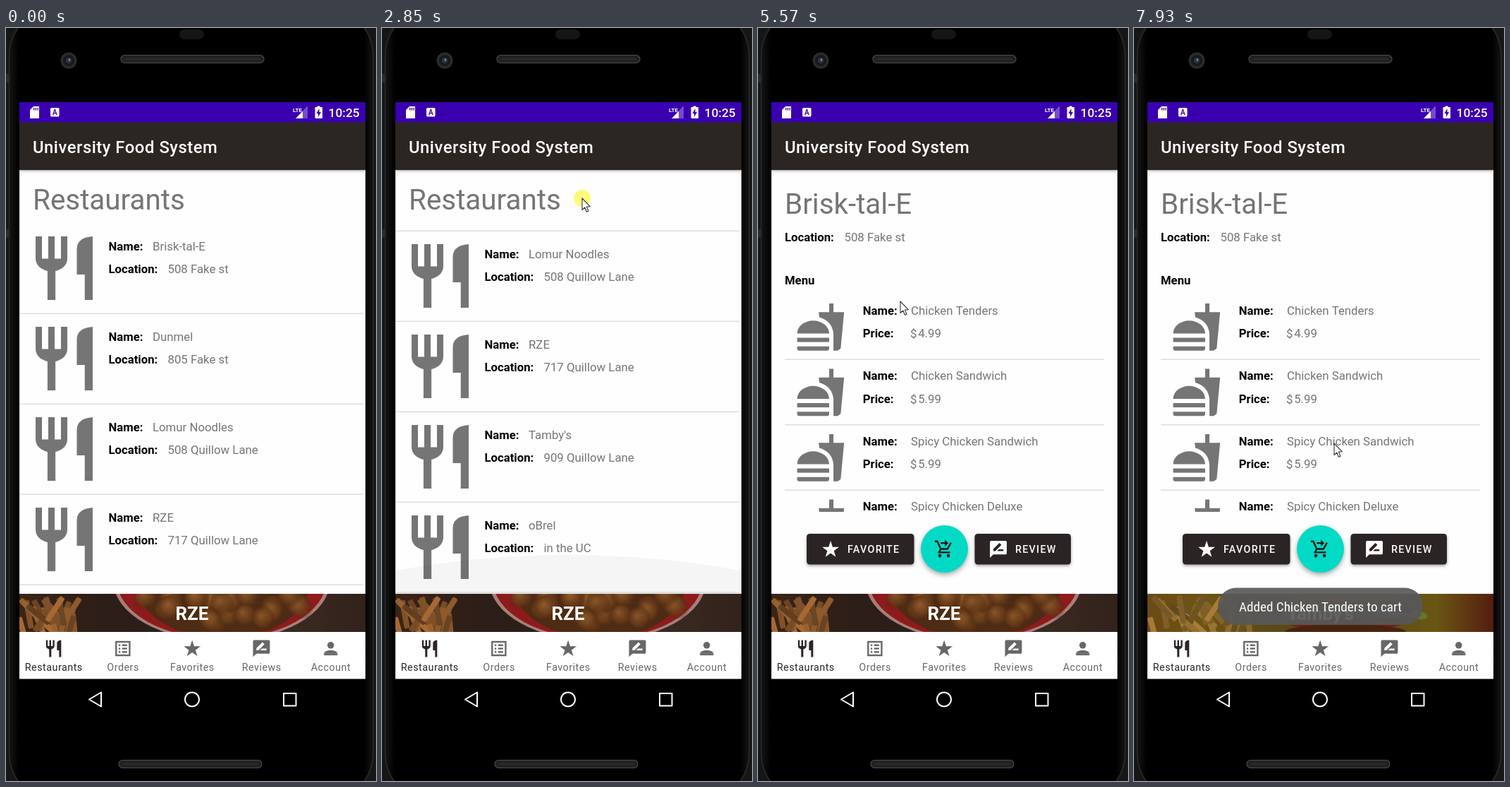
These frames come from a looping animation (525 by 1066 pixels, 8000 ms). An HTML page with a canvas:

```html
<!DOCTYPE html>
<html lang="en">
<head>
<meta charset="utf-8">
<title>University Food System</title>
<style>
html, body { margin: 0; width: 100%; height: 100%; overflow: hidden; background: #000; }
canvas { display: block; }
</style>
</head>
<body>
<canvas id="stage" width="525" height="1066"></canvas>
<script>
const ctx = document.getElementById('stage').getContext('2d');
const LOOP = 8000, STEP = 78, ANCHOR = 2060, OPEN = 4640;
const GRAY = '#757575', DARK = '#2b2424', RULE = '#dedede', PURPLE = '#3a00b0';
const ROW = 128, ITEM = 92.5, SCROLL_MAX = 245, GLOW_TIME = 450;

const places = [
  ['Brisk-tal-E', '508 Fake st'], ['Dunmel', '805 Fake st'],
  ['Lomur Noodles', '508 Quillow Lane'], ['RZE', '717 Quillow Lane'],
  ["Tamby's", '909 Quillow Lane'], ['oBrel', 'in the UC']
];
const menu = [
  ['Chicken Tenders', '4.99'], ['Chicken Sandwich', '5.99'],
  ['Spicy Chicken Sandwich', '5.99'], ['Spicy Chicken Deluxe', '6.99']
];
const tabs = [['fork', 'Restaurants'], ['list', 'Orders'], ['star', 'Favorites'],
  ['review', 'Reviews'], ['person', 'Account']];

// Pointer stops: time, x, y
const stops = [
  [812, 496, 407], [1100, 340, 334], [1370, 261, 357], [2060, 261, 357],
  [2380, 285, 500], [2840, 284, 241], [2930, 285, 183], [3620, 335, 789], [3780, 338, 842],
  [4560, 296, 300], [5020, 290, 292], [5250, 98, 231], [5570, 202, 387], [5800, 280, 570],
  [6040, 288, 340], [6240, 290, 560], [6506, 291, 438], [6670, 291, 400], [7140, 291, 432],
  [7390, 291, 432], [7910, 284, 588]
];
const presses = [[2380, 3740], [4480, OPEN], [6040, 6690], [7390, 7460]];
const drags = [[2380, 2930], [2930, 3740]];

const clamp = (v, lo, hi) => Math.min(hi, Math.max(lo, v));
const noise = n => { const r = Math.sin(n * 12.9898) * 43758.5453; return r - Math.floor(r); };

function pointerAt(t) {
  const i = stops.findIndex(s => s[0] > t);
  if (i <= 0) return (i ? stops[stops.length - 1] : stops[0]).slice(1);
  const [t0, x0, y0] = stops[i - 1], [t1, x1, y1] = stops[i], k = (t - t0) / (t1 - t0);
  return [x0 + (x1 - x0) * k, y0 + (y1 - y0) * k];
}

// The list follows the pointer while it is dragged
function scrollAt(t) {
  let s = 0;
  for (const [from, to] of drags)
    if (t > from) s = clamp(s + pointerAt(from)[1] - pointerAt(Math.min(t, to))[1], 0, SCROLL_MAX);
  return s;
}

function rect(x, y, w, h, fill) { ctx.fillStyle = fill; ctx.fillRect(x, y, w, h); }

function round(x, y, w, h, r, fill, stroke, line = 1) {
  ctx.beginPath();
  ctx.roundRect(x, y, w, h, r);
  if (fill) { ctx.fillStyle = fill; ctx.fill(); }
  if (stroke) { ctx.strokeStyle = stroke; ctx.lineWidth = line; ctx.stroke(); }
}

function oval(x, y, rx, ry, fill, turn = 0, from = 0, to = Math.PI * 2) {
  ctx.beginPath();
  ctx.ellipse(x, y, rx, ry, turn, from, to);
  if (fill) ctx.fillStyle = fill;
  ctx.fill();
}

function trace(...p) {
  ctx.moveTo(p[0], p[1]);
  for (let i = 2; i < p.length; i += 2) ctx.lineTo(p[i], p[i + 1]);
}

function poly(...p) {
  ctx.beginPath();
  trace(...p);
  ctx.closePath();
  ctx.fill();
}

// Icons on a 24 unit grid, drawn in the current colour
const icons = {
  fork() {
    for (const x of [3, 7, 11]) ctx.fillRect(x, 2, 2, 7.1);
    oval(8, 9, 5, 4, null, 0, 0, Math.PI);
    ctx.fillRect(6.75, 12, 2.5, 10);
    ctx.beginPath();
    ctx.moveTo(21, 2);
    ctx.quadraticCurveTo(16, 2.4, 16, 6);
    for (const [x, y] of [[16, 14], [18.5, 14], [18.5, 22], [21, 22]]) ctx.lineTo(x, y);
    ctx.fill();
  },
  list() {
    ctx.strokeRect(4, 4, 16, 16);
    for (const y of [7, 11, 15]) { ctx.fillRect(7, y, 2, 2); ctx.fillRect(11, y, 6, 2); }
  },
  star() {
    const p = [];
    for (let i = 0; i < 10; i++) {
      const r = i % 2 ? 4.1 : 10.5, a = i * Math.PI / 5;
      p.push(12 + r * Math.sin(a), 12.5 - r * Math.cos(a));
    }
    poly(...p);
  },
  review() {
    ctx.beginPath();
    trace(2, 3, 3, 2, 21, 2, 22, 3, 22, 17, 21, 18, 6, 18, 2, 22);
    trace(6, 14, 6, 11.5, 13.2, 4.4, 15.6, 6.8, 8.5, 14);
    trace(10.5, 14, 12.5, 12, 18, 12, 18, 14);
    ctx.fill('evenodd');
  },
  person() {
    oval(12, 8, 4, 4);
    oval(12, 18, 8, 4, null, 0, Math.PI);
    ctx.fillRect(4, 17.9, 16, 2.1);
  },
  meal() {
    oval(8.5, 15, 7.5, 6, null, 0, Math.PI);
    ctx.fillRect(1, 17, 15, 2);
    round(1, 21, 15, 2, [0, 0, 1, 1]);
    ctx.fill();
    ctx.beginPath();
    trace(11.1, 5, 16, 5, 16, 1, 18, 1, 18, 5, 23, 5, 21.4, 22, 20, 23, 18, 23, 18, 15);
    ctx.quadraticCurveTo(17.4, 9.2, 11.4, 7.4);
    ctx.fill();
  },
  cart() {
    ctx.beginPath();
    trace(1, 3, 4, 3, 8, 12, 16, 12, 20.2, 4.5);
    trace(8, 12, 6, 16, 19, 16);
    trace(8, 5, 14, 5);
    ctx.stroke();
    poly(13, 1, 17, 5, 13, 9);
    for (const x of [7, 17]) oval(x, 20, 2, 2);
  }
};

function icon(name, x, y, scale, color) {
  ctx.save();
  ctx.translate(x, y);
  ctx.scale(scale, scale);
  ctx.fillStyle = ctx.strokeStyle = color;
  ctx.lineWidth = 2;
  ctx.lineJoin = 'miter';
  icons[name]();
  ctx.restore();
}

const smallIcon = (name, cx, cy, color) => icon(name, cx - 14.3, cy - 14.3, 1.195, color);

function text(s, x, y, size, color, weight = 400, align = 'left', spacing = 0) {
  ctx.font = `${weight} ${size}px Roboto, sans-serif`;
  ctx.letterSpacing = spacing + 'px';
  ctx.textAlign = align;
  ctx.fillStyle = color;
  ctx.fillText(s, x, y);
}

function field(label, value, x, valueX, y) {
  text(label, x, y, 16.7, '#000', 700);
  text(value, valueX, y, 16.8, GRAY);
}

function clipped(x, y, w, h, draw) {
  ctx.save();
  ctx.beginPath();
  ctx.rect(x, y, w, h);
  ctx.clip();
  draw();
  ctx.restore();
}

function shadowed(alpha, blur, dy, draw) {
  ctx.save();
  ctx.shadowColor = `rgba(0,0,0,${alpha})`;
  ctx.shadowBlur = blur;
  ctx.shadowOffsetY = dy;
  draw();
  ctx.restore();
}

// Overscroll bulge that swells and fades; dir 1 hangs down, -1 rises
function glow(x, y, w, dir, depth, age) {
  if (age <= 0 || age >= GLOW_TIME) return;
  const edge = depth * .6;
  ctx.beginPath();
  trace(x, y, x, y + dir * edge);
  ctx.quadraticCurveTo(x + w / 2, y + dir * (2 * depth - edge), x + w, y + dir * edge);
  ctx.lineTo(x + w, y);
  ctx.fillStyle = `rgba(0,0,0,${.22 * Math.sin(Math.PI * age / GLOW_TIME)})`;
  ctx.fill();
}

function phone() {
  rect(0, 0, 525, 1066, '#161616');
  for (const y of [65, 285]) rect(0, y, 4, 12, '#2a2a2a');
  const side = ctx.createLinearGradient(5, 0, 521, 0);
  [[0, '#141414'], [.025, '#000'], [.975, '#000'], [1, '#141414']].forEach(s => side.addColorStop(...s));
  round(4.5, -30, 516.5, 1126, 70, side, '#2b2b2b', 1.5);
  round(246, 2, 35, 14, 7, '#151515');
  oval(89, 46, 11.5, 11.5, '#2b2b2d');
  oval(89, 46, 8, 8, '#18191c');
  oval(89, 46, 4, 4, '#2d3444');
  oval(90, 45, 1.5, 1.5, '#858b98');
  for (const [x, y] of [[163, 38.5], [160, 1036.5]]) {
    round(x, y, 203, 11, 5.5, '#222', '#4c4c4c', 1.2);
    rect(x + 6, y + 5, 191, 1, '#343434');
  }
  ctx.strokeStyle = '#fff';
  ctx.lineWidth = 2;
  ctx.lineJoin = 'round';
  ctx.beginPath();
  trace(135, 940.5, 118, 950.5, 135, 960.5);
  ctx.closePath();
  ctx.moveTo(274, 950.5);
  ctx.arc(264, 950.5, 10, 0, Math.PI * 2);
  ctx.rect(394, 942, 17.5, 17.5);
  ctx.stroke();
}

function bars() {
  shadowed(.4, 4, 1, () => rect(19, 133, 491, 68, '#2c2623'));
  rect(19, 105, 491, 28.5, PURPLE);
  text('University Food System', 38, 176.5, 23.9, '#fff', 500, 'left', .5);

  ctx.fillStyle = '#fff';
  poly(39, 111, 47, 111, 47, 128, 34, 128, 34, 116);
  for (let i = 0; i < 3; i++) rect(39 + i * 2.7, 113, 1.4, 3.5, PURPLE);
  round(63, 113, 12.5, 12.5, 1.5, '#fff');
  text('A', 69.3, 123, 10, PURPLE, 700, 'center');
  text('LTE', 407, 118.5, 8, '#fff', 700);
  ctx.fillStyle = 'rgba(255,255,255,.3)';
  poly(428, 110, 428, 128, 411, 128);
  ctx.fillStyle = '#fff';
  poly(421, 118, 421, 128, 411, 128);
  rect(441.5, 110.5, 4, 3, '#fff');
  round(438.5, 112, 10.5, 16, 1, '#fff');
  ctx.fillStyle = PURPLE;
  poly(444.5, 114, 440.5, 121, 443, 121, 443, 126, 447, 119, 444.5, 119);
  text('10:25', 457.5, 126, 17.4, '#fff', 500);

  rect(19, 855, 491, 66.5, '#fff');
  tabs.forEach(([name, label], i) => {
    const x = 67.5 + i * 98.3, color = i ? '#676767' : DARK;
    smallIcon(name, x, 878.5, color);
    text(label, x + .25, 910, 14.3, color, 400, 'center', .5);
  });
}

// Loose fries heaped in the lower left corner
function fries(n, spread, hue) {
  for (let i = 0; i < n; i++) {
    const x = spread * noise(i + 1);
    ctx.save();
    ctx.translate(19 + x, 818 + 36 * noise(i + 40));
    ctx.rotate(-1 + 1.7 * noise(i + 80));
    round(-4, -18, 8, 40, 2, `hsl(${hue},52%,${25 + 18 * noise(i + 9)}%)`);
    ctx.restore();
  }
}

function wash(...colors) {
  const g = ctx.createLinearGradient(19, 0, 510, 0);
  colors.forEach((c, i) => g.addColorStop(i / (colors.length - 1), c));
  rect(19, 801, 491, 54, g);
}

function friedBanner() {
  wash('#3b2416', '#2b1d17', '#2c211c', '#3a2b23', '#32221b');
  fries(22, 78, 28);
  oval(306, 782, 154, 86, '#a88078');
  oval(306, 781, 149, 84, '#8d1b1c');
  oval(308, 788, 122, 76, '#4d2b14');
  for (let i = 0; i < 26; i++) {
    const x = 198 + 220 * noise(i + 3), y = 801 + 50 * noise(i + 60);
    const g = ctx.createRadialGradient(x - 4, y - 4, 1, x, y, 20);
    g.addColorStop(0, 'rgba(142,90,42,.85)');
    g.addColorStop(.6, 'rgba(104,58,24,.7)');
    g.addColorStop(1, 'rgba(60,30,14,0)');
    oval(x, y, 20, 16, g, i);
  }
  text('RZE', 264, 838, 26, '#fff', 700, 'center');
}

function burgerBanner() {
  wash('#6b4a14', '#6e5416', '#5d4a16', '#5b4517', '#5d4c14', '#6a5613', '#541c10');
  fries(26, 145, 38);
  oval(306, 801, 88, 13, '#82511f');
  oval(303, 819, 94, 7, '#78281a');
  for (let i = 0; i < 14; i++)
    oval(208 + i * 15, 827 + 5 * Math.sin(i * 2), 14, 6, `hsl(72,48%,${21 + 10 * noise(i)}%)`, i * .5);
  oval(362, 825, 36, 5, '#673952', .1);
  oval(365, 828, 29, 2, '#95717e', .1);
  oval(300, 842, 83, 10, '#6f2017');
  oval(300, 855, 86, 11, '#47240f');
  text("Tamby's", 264.5, 838, 26, '#fff', 700, 'center');
}

function listPage(t) {
  const s = scrollAt(t);
  text('Restaurants', 38, 256.5, 40.4, GRAY);
  clipped(19, 277, 491, 524, () => {
    places.forEach(([name, spot], i) => {
      const y = i * ROW - s;
      icon('fork', 28.5, 286 + y, 4.5, GRAY);
      field('Name:', name, 145.5, 208, 314.5 + y);
      field('Location:', spot, 145.5, 229.5, 347.3 + y);
      rect(19, 403.5 + y, 488, 1.5, RULE);
    });
    glow(19, 801, 491, -1, 55, t - 2817);
    glow(19, 277, 491, 1, 63, t - 3207);
  });
}

function button(x, w, name, iconX, label, textX) {
  shadowed(.35, 4, 2, () => round(x, 716, w, 43.5, 4.5, DARK));
  smallIcon(name, iconX, 738, '#fff');
  text(label, textX, 743.2, 14.3, '#fff', 500, 'left', 1.28);
}

function detailPage(t) {
  const [name, spot] = places[0];
  text(name, 38, 262.5, 40.4, GRAY);
  field('Location:', spot, 38, 122.5, 302);
  text('Menu', 38, 363, 16.7, '#000', 700);
  clipped(38, 377.5, 453, 307.5, () => {
    menu.forEach(([dish, price], i) => {
      const y = i * ITEM;
      icon('meal', 52.5, 387 + y, 3.03, GRAY);
      field('Name:', dish, 148.8, 217, 405.5 + y);
      field('Price:', '$\u200a' + price, 148.8, 216, 438.3 + y);
      rect(38, 468.5 + y, 453, 1.5, RULE);
    });
    glow(38, 377.5, 453, 1, 41, t - 6098);
    glow(38, 685, 453, -1, 30, t - 6287);
  });
  button(69, 152.5, 'star', 103, 'FAVORITE', 127);
  button(307.5, 136.5, 'review', 341, 'REVIEW', 365);
  shadowed(.35, 7, 3, () => oval(264.5, 737.5, 33.5, 33.5, '#03dac5'));
  smallIcon('cart', 264, 737.5, '#1c1718');
}

function toast(t) {
  ctx.save();
  ctx.globalAlpha = clamp((t - 7440) / 240, 0, 1);
  round(119, 792.5, 291, 52.5, 26, 'rgba(88,88,88,.92)');
  ctx.font = "400 condensed 19.1px 'Roboto Condensed', Roboto, sans-serif";
  ctx.letterSpacing = '0px';
  ctx.textAlign = 'center';
  ctx.fillStyle = '#fff';
  ctx.fillText('Added Chicken Tenders to cart', 264.5, 826);
  ctx.restore();
}

function mouse(t) {
  if (t < stops[0][0]) return;
  const [x, y] = pointerAt(t);
  if (presses.some(([from, to]) => t >= from && t < to)) oval(x, y, 12, 12, 'rgba(255,250,80,.75)');
  ctx.save();
  ctx.translate(x, y);
  ctx.fillStyle = '#fff';
  ctx.strokeStyle = '#333';
  ctx.lineWidth = 1.1;
  poly(0, 0, 0, 16.5, 3.8, 13, 6.3, 19.3, 8.9, 18.2, 6.4, 12.1, 11.4, 11.8);
  ctx.stroke();
  ctx.restore();
}

function draw(now) {
  const time = now % LOOP;
  const t = ANCHOR + Math.floor((time - ANCHOR + 4) / STEP) * STEP;
  phone();
  rect(19, 133, 491, 722, '#fefefe');
  (time < OPEN ? listPage : detailPage)(t);
  clipped(19, 801, 491, 54, t < 6110 ? friedBanner : burgerBanner);
  bars();
  toast(t);
  mouse(t);
}

const start = performance.now();
function tick() {
  draw(performance.now() - start);
  requestAnimationFrame(tick);
}
tick();
</script>
</body>
</html>
```
